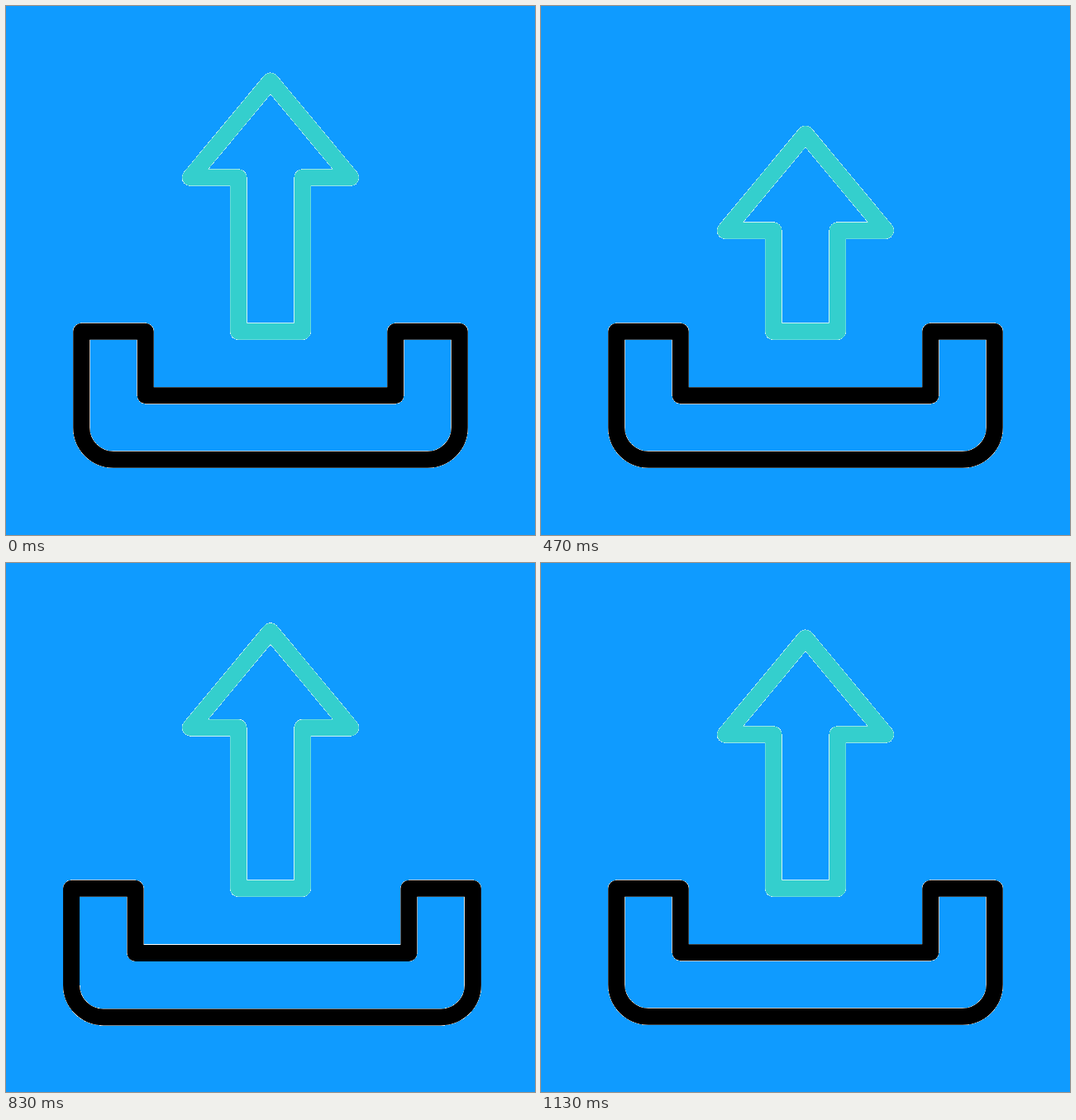
An HTML page for the animation above (1.5 s loop, 640 px wide and 640 px high).

```html
<!DOCTYPE html>
<html lang="en">
<head>
<meta charset="utf-8">
<title>Upload</title>
<style>
  html, body { margin: 0; height: 100%; overflow: hidden; background: #0f9bff; }
  svg { display: block; width: 100vw; height: 100vh; }
  path { fill: none; stroke-width: 20; stroke-linejoin: round; }
  .tray { stroke: #000; }
  .arrow { stroke: #34cfcd; }
  /* Hard-edged white backing that shows through the soft line edges */
  .fringe { stroke: #fff; stroke-width: 20.8; shape-rendering: crispEdges; }
</style>
</head>
<body>
<svg viewBox="0 0 640 640">
  <path class="tray fringe"/>
  <path class="tray"/>
  <path class="arrow fringe"/>
  <path class="arrow"/>
</svg>
<script>
const LOOP = 1500;

// Keyframes as [frame, value], at 30 frames per second
const headKeys = [[0, 0], [11.1, 95], [20.8, -48.7], [29.2, 32.2], [34, 0]];
const stretchKeys = [[14, 0], [21, 1], [28, 0]];

const smooth = s => s * s * (3 - 2 * s);

function valueAt(keys, frame) {
  if (frame <= keys[0][0]) return keys[0][1];
  for (let i = 1; i < keys.length; i++) {
    const [start, from] = keys[i - 1];
    const [end, to] = keys[i];
    if (frame < end) return from + (to - from) * smooth((frame - start) / (end - start));
  }
  return keys[keys.length - 1][1];
}

function setPath(name, d) {
  for (const path of document.querySelectorAll('.' + name)) path.setAttribute('d', d);
}

function draw() {
  const ms = performance.now() % LOOP;
  // Frame starts fall on whole hundredths of a second
  const frame = Math.floor((Math.floor(ms / 10) * 10 + 4) * 0.03);

  const dy = valueAt(headKeys, frame);
  const ledge = 207.5 + dy;
  setPath('arrow',
    `M320 ${90.9 + dy}L416.9 ${ledge}H358.75V393.75H281.25V${ledge}H223.1Z`);

  const stretch = valueAt(stretchKeys, frame);
  const left = -31 * stretch, right = 41 * stretch, down = 1.6 * stretch;
  setPath('tray',
    `M${91.25 + left} 393.75H${168.75 + left}V${471.25 + down}H${471.25 + right}V393.75H${548.75 + right}` +
    `V${510 + down}a38.75 38.75 0 0 1 -38.75 38.75H${130 + left}a38.75 38.75 0 0 1 -38.75 -38.75Z`);

  requestAnimationFrame(draw);
}
draw();
</script>
</body>
</html>
```
